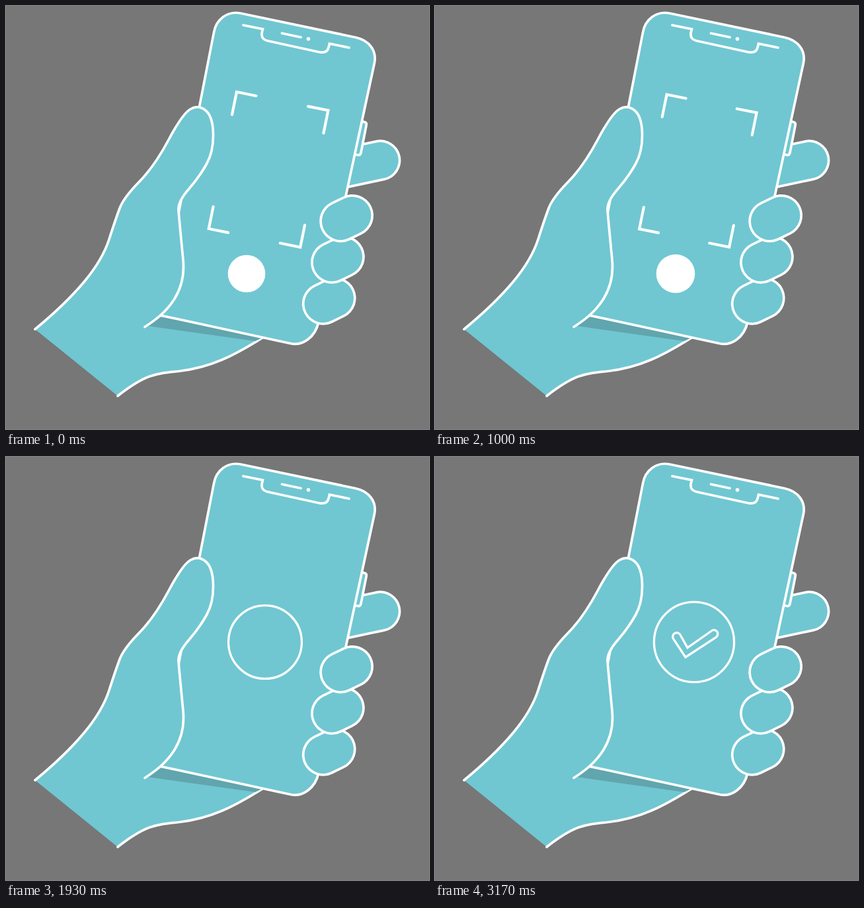
Write an HTML page that moves like this. It is 640 px wide and 640 px high and loops after 4030 ms.

```html
<!DOCTYPE html>
<html lang="en">
<head>
<meta charset="utf-8">
<title>Phone capture</title>
<style>
  html, body { margin: 0; width: 100%; height: 100%; overflow: hidden; background: #777; }
  svg { display: block; width: 100%; height: 100%; }
  .body { fill: #70c7d1; stroke: #fff; }
  .line { fill: none; stroke: #fff; }
  .flat { fill: #70c7d1; }
  .white { fill: #fff; }
  .body, .line { stroke-width: 3.7; stroke-linecap: round; }
  .line.mark { stroke-width: 3.3; stroke-linecap: butt; }
</style>
</head>
<body>
<svg viewBox="0 0 640 640">
  <g id="backFinger"></g>
  <path class="body" d="M538 174.5L542.5 175.5Q546 176.5 545.3 180L537 222Q536 226 532.5 225.5L528 224.5"/>

  <path class="flat" d="M44 489L169 590C210 558 225 556 262 552.5C310 547 345 529 388 502L237 469Z"/>
  <path class="line" d="M169 590C210 558 225 556 262 552.5C310 547 345 529 388 502"/>
  <path fill="#61a5ae" d="M214 484L237 469L388 502L377 507Z"/>

  <path class="body" d="M314.5 40C318 20 335 7 355 11L529 47.5C550 52 561.5 68 557.3 87L473 478C468 501 449 515 430 510.5L231 467.5Z"/>
  <path class="line" d="M359 29L388.5 35L387 41Q386 50 395 52.5L475 70Q486 71.5 488 63L489.5 57L519 63M417.5 41.3L446 47.3"/>
  <circle class="white" cx="457.5" cy="49.8" r="2.8"/>

  <path id="flash" class="white" d="M330 92L527 131L466 436L269 397Z"/>
  <g id="camera">
    <path id="frame" class="line" style="stroke-width:4.2"/>
    <circle id="shutter" class="white" cx="364" cy="405"/>
  </g>

  <circle id="ring" class="line mark" cx="392" cy="280"/>
  <g id="check">
    <path id="tickOuter" class="line mark" pathLength="1" d="M362.7 266.8A6 6 0 0 0 360.5 275L379 303L425 272.8A6 6 0 0 0 426.8 264.3"/>
    <path id="tickInner" class="line mark" pathLength="1" d="M362.7 266.8A6 6 0 0 1 371 269L382 288.5L418.5 263A6 6 0 0 1 426.8 264.3"/>
  </g>

  <path id="handFill" class="flat"/>
  <path id="handLine" class="line"/>
  <g id="fingers"></g>
</svg>
<script>
const LOOP = 4030;
const RING = 60.6;
const el = id => document.getElementById(id);
const set = (id, name, value) => el(id).setAttribute(name, value);
const show = (id, on) => set(id, 'visibility', on ? 'visible' : 'hidden');
const mix = (a, b, k) => a.map((v, i) => v + (b[i] - v) * k);

// A finger is a thick round line with a white rim.
function finger(x1, y1, x2, y2, r) {
  const layer = (width, color) =>
    `<path d="M${x1} ${y1}L${x2} ${y2}" stroke="${color}" stroke-width="${width}" stroke-linecap="round"/>`;
  return layer(2 * r + 3.7, '#fff') + layer(2 * r - 3.7, '#70c7d1');
}

// One bracket in each corner of a slanted box, its arms pointing inwards.
function brackets() {
  const at = (u, v) => `${349 + .98 * u - .2 * v} ${130 + .198 * u + .98 * v}`;
  const w = 141.3, h = 211.2;
  return [[0, 0], [1, 0], [1, 1], [0, 1]].map(([a, b]) => {
    const u = a * w, v = b * h;
    return `M${at(u, v + (b ? -34 : 35))}L${at(u, v)}L${at(u + (a ? -31 : 30), v)}`;
  }).join('');
}

// Guide points from the knuckle over the thumb to its inner base.
const rest = [[146, 384], [166, 322], [178, 290], [225, 242], [267, 163], [291, 149],
  [313, 167], [314, 220], [293, 258], [260, 296], [262, 322]];
const half = [[147, 384], [173, 320], [185, 279], [210, 267], [303, 212], [322, 196],
  [349, 206], [344, 257], [311, 286], [267, 309], [263.5, 316]];
const press = [[155, 390], [175, 338], [195, 302], [226, 270], [253, 286], [318, 346],
  [354, 361], [350, 395], [312, 400], [273, 378], [270, 382]];

// Smooth curve that touches the middle of each leg between guide points.
function handPath(pose) {
  const [from, to, k] = pose < 1 ? [rest, half, pose] : [half, press, pose - 1];
  const guide = [[90, 451], ...from.map((p, i) => mix(p, to[i], k)), [274, 446]];
  const last = guide.length - 1;
  return 'M44 489' + guide.map((p, i) =>
    `Q${p} ${i < last ? mix(p, guide[i + 1], .5) : '210,485.5'}`).join('');
}

function drawTick(id, part) {
  set(id, 'stroke-dasharray', part >= 1 ? 'none' : `${part} 2`);
  show(id, part > 0);
}

function render(t) {
  const linear = (a, b) => Math.min(1, Math.max(0, (t - a) / (b - a)));
  const ramp = (a, b) => (1 - Math.cos(Math.PI * linear(a, b))) / 2;

  const hand = handPath(2 * (ramp(510, 670) - ramp(720, 940)));
  set('handLine', 'd', hand);
  set('handFill', 'd', hand + 'L150 572Z');

  const zoom = 1 - .08 * ramp(690, 830) + .115 * ramp(880, 1110) - .035 * ramp(1110, 1340);
  set('frame', 'transform', `translate(441 354) scale(${zoom}) translate(-441 -354)`);
  set('shutter', 'r', 28.3 + ramp(690, 830) - ramp(1110, 1310));
  set('flash', 'opacity', .285 * (ramp(730, 800) - ramp(800, 1010)));
  set('camera', 'opacity', 1 - linear(1570, 1760));

  const radius = 67.2 * ramp(1590, 2060) - (67.2 - RING) * ramp(2170, 2700);
  set('ring', 'r', radius);
  show('ring', radius > 0);

  const drawn = ramp(2000, 2400);
  set('check', 'transform', `translate(392 280) scale(${Math.sqrt(radius / RING)}) translate(-392 -280)`);
  drawTick('tickOuter', drawn ** .87);
  drawTick('tickInner', drawn ** 1.13);
}

set('frame', 'd', brackets());
el('backFinger').innerHTML = finger(505, 246.5, 566.3, 233.5, 29.3);
// Fingers overlap downwards, so the lowest is drawn first.
el('fingers').innerHTML = [2, 1, 0].map(i => {
  const x = -13.2 * i, y = 62.5 * i;
  return finger(506.3 + x, 325.6 + y, 524 + x, 317 + y, 30.2);
}).join('');

const start = performance.now();
function tick() {
  render((performance.now() - start) % LOOP);
  requestAnimationFrame(tick);
}
tick();
</script>
</body>
</html>
```
